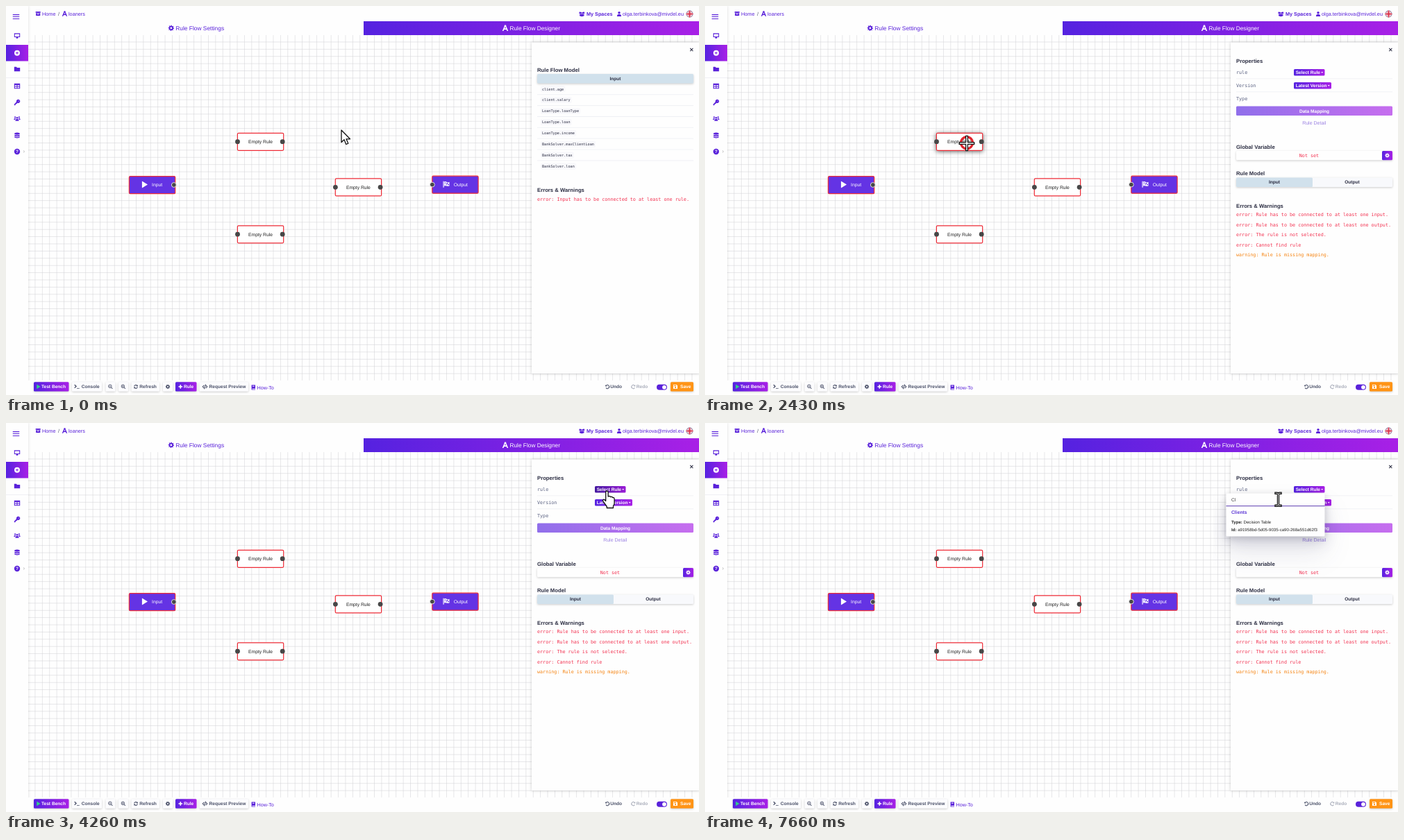
Animation, 998 px wide and 561 px high, one loop 8000 ms. Source, as an HTML page:

```html
<!DOCTYPE html>
<html lang="en">
<head>
<meta charset="utf-8">
<title>Rule flow designer</title>
<style>
html, body { margin: 0; width: 100%; height: 100%; overflow: hidden; background: #fefefe; }
svg { display: block; font-family: "Liberation Sans", Arial, sans-serif; text-rendering: geometricPrecision; }
text { white-space: pre; }
.b { font-weight: 700; }
.m { font-family: "DejaVu Sans Mono", monospace; }
.c { text-anchor: middle; }
.soft { filter: drop-shadow(0 1px 1.5px #0003); }
.float { filter: drop-shadow(0 2px 4px #0002) drop-shadow(0 8px 9px #32325d29) drop-shadow(0 22px 18px #32325d1c); }
.hover { filter: drop-shadow(0 1px 3px #0009); }
</style>
</head>
<body>
<svg id="stage" width="998" height="561" viewBox="0 0 998 561"></svg>
<script>
const PURPLE = '#5a22da', INK = '#2b2d42', SLATE = '#4a5068', RED = '#f2304f', NODE_RED = '#ee2b36';
const SMALL = 6.6, MONO = 6.74, LOOP = 8000;

const gearPath = () => {
  const points = [];
  for (let i = 0; i < 32; i++) {
    const r = i % 4 < 2 ? 8 : 5.8, a = i * Math.PI / 16;
    points.push(`${(8 + r * Math.cos(a)).toFixed(1)} ${(8 + r * Math.sin(a)).toFixed(1)}`);
  }
  return `M${points.join('L')}zM8 5.4a2.6 2.6 0 1 0 0 5.2 2.6 2.6 0 0 0 0-5.2z`;
};
const lens = 'M6.5 0a6.5 6.5 0 0 1 5.2 10.3L16 14l-2 2-3.7-4.3A6.5 6.5 0 1 1 6.5 0zM6.5 2a4.5 4.5 0 1 0 0 9 4.5 4.5 0 0 0 0-9z';
const disc = 'M8 0a8 8 0 1 1 0 16 8 8 0 1 1 0-16z';

// Icon outlines in a 16 by 16 box
const icons = {
  menu: 'M0 2h16v2H0zM0 7h16v2H0zM0 12h16v2H0z',
  desktop: 'M0 1h16v11H0zM2 3v7h12V3zM6 12h4l1 3H5z',
  add: disc + 'M7 4v3H4v2h3v3h2V9h3V7H9V4z',
  folder: 'M0 2h6l2 2h8v10H0z',
  table: 'M0 1h16v14H0zM2 5v3h5V5zM9 5v3h5V5zM2 10v3h5v-3zM9 10v3h5v-3z',
  key: 'M11 0a5 5 0 1 1-2 9.5L7 12H5v2H3v2H0v-3l6.2-6.2A5 5 0 0 1 11 0zM12 3a1 1 0 1 0 0 2 1 1 0 0 0 0-2z',
  users: 'M8 3a2.7 2.7 0 1 1 0 5.4A2.7 2.7 0 1 1 8 3zM2.5 2a2 2 0 1 1 0 4 2 2 0 1 1 0-4zM13.500 2a2 2 0 1 1 0 4 2 2 0 1 1 0-4zM3 14q0-5 4-5h2q4 0 4 5zM-1 11q0-4 3-4h2.5l-2 4zM17 11q0-4-3-4h-2.5l2 4z',
  database: 'M1 2q7-3 14 0v3q-7 3-14 0zM1 6.5q7 3 14 0V10q-7 3-14 0zM1 11.5q7 3 14 0V14q-7 3-14 0z',
  disc,
  gear: gearPath(),
  archive: 'M0 1h16v4H0zM1 6h14v9H1zM5 8v2h6V8z',
  compass: 'M6 0h4l1 4 5 12h-3l-2-4H5l-2 4H0L5 4zM8 4 6 9h4z',
  box: 'M2 2l6 2 6-2 2 4-6 2-2-3-2 3-6-2zM2 8l4 1 2-2 2 2 4-1v5l-6 2-6-2z',
  user: 'M8 0a4 4 0 1 1 0 8 4 4 0 1 1 0-8zM1 16q0-7 5-7h4q5 0 5 7z',
  play: 'M2 0l13 8-13 8z',
  terminal: 'M0 3l2-2 6 6-6 6-2-2 4-4zM8 12h8v2H8z',
  zoomOut: lens + 'M3.5 5.7h6v1.6h-6z',
  zoomIn: lens + 'M3.5 5.7h2.2V3.5h1.6v2.2h2.2v1.6H7.3v2.2H5.7V7.3H3.5z',
  refresh: 'M1 7A7 7 0 0 1 13 3l2-2v6H9l2-2A4.5 4.5 0 0 0 3.5 7zM15 9A7 7 0 0 1 3 13l-2 2V9h6l-2 2a4.5 4.5 0 0 0 7.5-2z',
  undo: 'M1 1v6h6L4.8 4.8A5 5 0 1 1 4 11L2 12.5A7.5 7.5 0 1 0 3 3z',
  redo: 'M15 1v6H9l2.2-2.2A5 5 0 1 0 12 11l2 1.5A7.5 7.5 0 1 1 13 3z',
  plus: 'M6 1h4v5h5v4h-5v5H6v-5H1V6h5z',
  code: 'M5 3 0 8l5 5 1.5-1.5L3 8l3.5-3.5zM11 3l5 5-5 5-1.5-1.5L13 8 9.5 4.5zM9 1l2 .5-4 13.5-2-.5z',
  book: 'M2 0h12v12H4v2h10v2H2zM5 3v2h6V3z',
  save: 'M0 0h12l4 4v12H0zM2 2v4h9V2zM8 8a3 3 0 1 0 0 6 3 3 0 0 0 0-6z',
  flag: 'M0 0h2v16H0zM3 1q3-1 6 1t7 0v10q-4 1-7 0t-6 0zM5 3h2v3H5zM9 4h3v3H9zM7 7h2v3H7zM12 7h3v3h-3z',
  close: 'M3 1 8 6l5-5 2 2-5 5 5 5-2 2-5-5-5 5-2-2 5-5-5-5z',
};

const text = (x, y, s, size = SMALL, cls = '', fill = INK) =>
  `<text x="${x}" y="${y + size * .35}" font-size="${size}" class="${cls}" fill="${fill}">${s}</text>`;
const rect = (x, y, w, h, fill, extra = '') =>
  `<rect x="${x}" y="${y}" width="${w}" height="${h}" fill="${fill}" ${extra}/>`;
const line = (x1, y, x2, color = '#e6e8ee', w = .6) =>
  `<path d="M${x1} ${y}H${x2}" stroke="${color}" stroke-width="${w}"/>`;
const icon = (name, x, y, size = 8, fill = PURPLE) =>
  `<path transform="translate(${x - size / 2} ${y - size / 2}) scale(${size / 16})" d="${icons[name]}" fill="${fill}" fill-rule="evenodd"/>`;
const group = (id, body, extra = '') => `<g id="${id}" ${extra}>${body}</g>`;
const button = (x, w, fill = '#fcfcfe') => rect(x, 542.3, w, 13.4, fill, 'rx="1.5" class="soft"');

function sidebar() {
  const items = [['desktop', 43], ['folder', 91], ['table', 115.5], ['key', 139], ['users', 162.5], ['database', 186.5], ['disc', 210]];
  return rect(0, 0, 32, 561, '#fefefe', 'style="filter:drop-shadow(0 0 2px #0002)"')
    + icon('menu', 14.5, 15.5, 9.5) + rect(0, 56, 32, 23.5, 'url(#brand)') + icon('add', 16, 67.8, 8, '#fff')
    + items.map(([name, y]) => icon(name, 16, y, 8.4)).join('')
    + text(16, 210, '?', 6.5, 'b c', '#fff') + text(24.5, 209.5, '›', 8, '', '#aaa') + line(0, 103.5, 32);
}

function header() {
  const flag = `<g clip-path="url(#round)">${rect(979, 6, 11, 11, '#31437e')}
    <path d="M979 6l11 11M990 6l-11 11" stroke="#fff" stroke-width="2"/><path d="M979 6l11 11M990 6l-11 11" stroke="#d8304a" stroke-width=".7"/>
    <path d="M984.5 6v11M979 11.5h11" stroke="#fff" stroke-width="3.4"/><path d="M984.5 6v11M979 11.5h11" stroke="#d8304a" stroke-width="2"/></g>`;
  return rect(32, 0, 966, 42, '#fefefe') + rect(515, 22, 483, 20, 'url(#brand)')
    + icon('archive', 46.2, 11, 7) + text(52, 11.2, 'Home', 7.3, '', PURPLE) + text(75, 11.2, '/', 7.3, '', SLATE)
    + icon('compass', 84.5, 11, 7.5) + text(90, 11.2, 'loaners', 7.3, '', PURPLE)
    + icon('box', 829.3, 11.5, 8.5) + text(836, 11.5, 'My Spaces', 7.25, 'b', PURPLE)
    + icon('user', 883, 11.5, 7) + text(888, 11.5, 'olga.terbinkova@mivdel.eu', 7.29, '', PURPLE) + flag
    + icon('gear', 237.8, 31.8, 8.5) + text(244.3, 31.8, 'Rule Flow Settings', 8.4, '', PURPLE)
    + icon('compass', 719, 31.8, 8.5, '#fff') + text(725.5, 31.8, 'Rule Flow Designer', 8.3, '', '#fff');
}

function toolbar() {
  const y = 549, pale = '#a9adba';
  const label = (x, s, fill = SLATE) => text(x, y, s, SMALL, 'b', fill);
  return rect(32, 540, 966, 21, '#fefefe')
    + button(40, 50.5, 'url(#brand)') + icon('play', 46.7, y, 6.5, '#2fd08a') + label(51, 'Test Bench', '#fff')
    + button(95, 43) + icon('terminal', 102, y, 7.5, SLATE) + label(108.7, 'Console')
    + button(143.5, 14) + icon('zoomOut', 150.5, y, 6.5, SLATE)
    + button(162, 14) + icon('zoomIn', 169, y, 6.5, SLATE)
    + button(180.5, 40.5) + icon('refresh', 187, y, 6.5, SLATE) + label(192.3, 'Refresh')
    + button(226, 14) + icon('gear', 233, y, 6.5, SLATE)
    + button(244, 30.5, 'url(#brand)') + icon('plus', 251.3, y, 6.5, '#fff') + label(256, 'Rule', '#fff')
    + button(278.5, 70.5) + icon('code', 286.5, y, 8, SLATE) + label(292.5, 'Request Preview')
    + icon('book', 356.3, 550, 7.2) + text(361.5, 550.2, 'How-To', 7.2, '', PURPLE)
    + icon('undo', 866, y, 6.5, SLATE) + label(870.3, 'Undo')
    + icon('redo', 903.5, y, 6.5, pale) + label(907.8, 'Redo', pale)
    + rect(937, 545.8, 15, 8, PURPLE, 'rx="4"') + '<circle cx="948" cy="549.8" r="2.9" fill="#fff"/>'
    + button(957, 33, '#ff9416') + icon('save', 964, y, 6, '#fff') + label(971, 'Save', '#fff');
}

const box = (x, y, fill, extra = '') =>
  rect(x, y, 66.3, 25, fill, `rx="1.5" stroke="${NODE_RED}" stroke-width="1.2" ${extra}`);
const port = (x, y, extra = '') => `<circle cx="${x}" cy="${y}" r="3.4" fill="#474747" ${extra}/>`;
const emptyRule = (x, y, id) => box(x, y, '#fff', `id="${id}"`) + text(x + 33.1, y + 12.4, 'Empty Rule', 6.77, 'c', '#222')
  + port(x + .1, y + 12.4) + port(x + 64.8, y + 12.4);

function nodes() {
  const ring = 'stroke="#eee" stroke-width=".9"';
  return emptyRule(333.4, 183.3, 'target') + emptyRule(333.4, 316.8, 'lower') + emptyRule(474.3, 248.9, 'middle')
    + box(177.4, 245.7, '#6433e4') + icon('play', 199.6, 257.5, 10, '#fff') + text(210, 258, 'Input', 6.75, '', '#fff') + port(241.8, 258, ring)
    + box(613.8, 245.2, '#6433e4') + icon('flag', 634, 257.2, 9, '#fff') + text(644.7, 257.6, 'Output', 6.75, '', '#fff') + port(613.9, 257.6, ring);
}

const heading = (y, s) => text(765, y, s, 7.72, 'b');
const mono = (y, s, fill = RED) => text(765, y, s, MONO, 'm', fill);

function modelPanel() {
  const rows = ['client.age', 'client.salary', 'LoanType.loanType', 'LoanType.loan', 'LoanType.income',
    'BankSolver.maxClientLoan', 'BankSolver.tax', 'BankSolver.loan'];
  return heading(92, 'Rule Flow Model') + rect(765, 98, 225, 13.5, '#d1e1ec', 'rx="1.5" class="soft"')
    + text(877.5, 104.8, 'Input', 6.5, 'b c')
    + rows.map((s, i) => {
      const y = 119.8 + i * 15.87;
      return rect(770, y - 4.5, s.length * 3.13 + 4, 9, '#f8f8fb', 'rx="1.5"') + text(772, y, s, 5.2, 'm')
        + (i < 7 ? line(765, y + 7.9, 990) : '');
    }).join('')
    + heading(265.5, 'Errors &amp; Warnings') + mono(279, 'error: Input has to be connected to at least one rule.');
}

const select = (y, w, s, id) => rect(848, y - 4.8, w, 9.6, 'url(#brand)', `id="${id}" rx="1.5"`)
  + text(850.7, y, s, 6.55, 'b', '#fff') + `<path d="M${848 + w - 5.3} ${y - .7}h3l-1.5 1.7z" fill="#fff"/>`;

function rulePanel() {
  const errors = ['Rule has to be connected to at least one input.', 'Rule has to be connected to at least one output.',
    'The rule is not selected.', 'Cannot find rule'];
  return heading(79.5, 'Properties')
    + mono(95.6, 'rule', '#5b6282') + select(95.7, 44.5, 'Select Rule', 'select') + line(765, 104.8, 990)
    + mono(114.3, 'Version', '#5b6282') + select(114.7, 54, 'Latest Version', 'version') + line(765, 123.8, 990)
    + mono(133.3, 'Type', '#5b6282')
    + rect(765, 144.5, 225, 13.5, 'url(#brand)', 'rx="1.5" opacity=".65"') + text(877.5, 151.2, 'Data Mapping', SMALL, 'b c', '#fff')
    + text(877.3, 168.7, 'Rule Detail', 7, 'c', '#9a80e2')
    + heading(202.8, 'Global Variable') + rect(765, 209, 225, 13.3, '#fefefe', 'rx="1.5" class="soft"')
    + text(870, 215.6, 'Not set', MONO, 'm c', RED) + rect(975, 209, 15, 13.3, 'url(#brand)', 'rx="1.5"') + icon('gear', 982.5, 215.5, 6.5, '#fff')
    + heading(241, 'Rule Model') + rect(765, 247.5, 225, 13.5, '#f8f9fc', 'rx="1.5" class="soft"') + rect(765, 247.5, 110, 13.5, '#d1e1ec', 'rx="1.5"')
    + text(820, 254, 'Input', SMALL, 'b c') + text(932, 254, 'Output', SMALL, 'b c')
    + heading(287.8, 'Errors &amp; Warnings') + errors.map((s, i) => mono(301 + i * 14.4, 'error: ' + s)).join('')
    + mono(358.4, 'warning: Rule is missing mapping.', '#f5820f');
}

function option(x, y, name, id) {
  const pair = (dy, key, value) => text(x, y + dy, `<tspan class="b">${key}:</tspan> ${value}`, 6.12, '', '#222');
  return text(x, y, name, 6.75, 'b', '#5b35d5') + pair(13.6, 'Type', 'Decision Table') + pair(24.6, 'Id', id);
}

function fullMenu() {
  const rules = [['RC', 'fc63d823-b7e1-c08e-3a72-605aaee2c740'], ['Louisiana Tax Credit', 'eabd4cfa-9271-4dc5-0692-b6fe6d9c7e63'],
    ['V4', 'ea2a5539-08ad-da76-5032-7666e56e8ef7'], ['FinalScore', 'e2367b8e-cfc6-775e-9f61-b2e767b88225'], ['Louisiana Exemption', '']];
  return rect(740, 101.5, 152, 207.5, '#fefefe', 'rx="1.5" class="float"')
    + `<g clip-path="url(#list)">${rules.map(([name, id], i) => option(748, 129 + i * 43.35, name, id)
      + line(740, 163.5 + i * 43.35, 884)).join('')}</g>`
    + rect(884, 102, 8, 206.5, '#f1f1f1') + rect(884.7, 110.5, 6.4, 25.8, '#c1c1c1')
    + '<path d="M886 107.5h4l-2-2.3z" fill="#888"/><path d="M886 303h4l-2 2.3z" fill="#444"/>'
    + line(740, 119.7, 884, '#5a3bb0', 1);
}

function filteredMenu() {
  return rect(750.5, 101.5, 142, 62, '#fefefe', 'rx="1.5" class="float"') + line(750.5, 119.7, 892.5, '#5a3bb0', 1)
    + option(758, 129, 'Clients', 'a91958bd-5d05-9035-ca90-268a551d62f3');
}

function cursors() {
  const shape = (name, d) => `<path id="${name}" d="${d}" fill="#fff" stroke="#111" stroke-width="1.3" stroke-linejoin="round"/>`;
  // Repeats one arm of a cross in four directions.
  const cross = arm => 'M' + [0, 1, 2, 3].flatMap(turn => arm.map(([x, y]) => {
    for (let i = 0; i < turn; i++) [x, y] = [-y, x];
    return `${x} ${y}`;
  })).join('L') + 'z';
  const beam = 'M-3.5-9H-2Q0-9 0-7V7Q0 9-2 9H-3.5M3.5-9H2Q0-9 0-7M0 7Q0 9 2 9H3.5';
  return shape('arrow', 'M0 0V17.5L4 13.8 6.8 20.5 9.8 19.2 7 12.8H12.5z')
    + shape('move', cross([[-1.3, -1.3], [-1.3, -7.5], [-5, -7.5], [0, -13], [5, -7.5], [1.3, -7.5]]))
    + shape('cross', cross([[-1.4, -1.4], [-1.4, -10.7], [1.4, -10.7]]))
    + shape('hand', 'M.2 3Q.2 1 1.9 1T3.7 3V9Q6.4 7.7 7.3 9.7 9.2 8.8 10 10.6 12.6 10 12.6 12.8V18.5Q12.6 21 11 22.5V25.5H1.8V23.5L-3.3 16.5Q-4.8 13.9-3 13.3-1.6 13 .2 15.5z')
    + `<g id="beam" fill="none" stroke-linecap="square"><path d="${beam}" stroke="#111" stroke-width="3.4"/><path d="${beam}" stroke="#fff" stroke-width=".8"/></g>`;
}

const stage = document.getElementById('stage');
stage.innerHTML = `<defs>
  <linearGradient id="brand"><stop stop-color="#5522e0"/><stop offset="1" stop-color="#a820e6"/></linearGradient>
  <linearGradient id="brandDark"><stop stop-color="#43189f"/><stop offset="1" stop-color="#9a1cd6"/></linearGradient>
  <pattern id="grid" x="32" y="42" width="10.396" height="10.396" patternUnits="userSpaceOnUse">
    <path d="M10.1 0V10.396M0 10.1H10.396" stroke="#cfcfd3" stroke-width=".6"/></pattern>
  <clipPath id="round"><circle cx="984.5" cy="11.5" r="4.9"/></clipPath>
  <clipPath id="list"><path d="M740 101.5h152V308.5H740z"/></clipPath>
  <clipPath id="popup"><path d="M732 52H998V530H732z"/></clipPath></defs>`
  + rect(0, 0, 998, 561, '#fefefe') + rect(32, 42, 966, 498, 'url(#grid)')
  + header() + sidebar() + toolbar() + nodes()
  + rect(757, 52.5, 241, 477.5, '#fefefe', 'style="filter:drop-shadow(0 0 2px #0003)"') + icon('close', 987.3, 63, 5.5, INK)
  + group('modelPanel', modelPanel()) + group('rulePanel', rulePanel())
  + group('fullMenu', fullMenu(), 'clip-path="url(#popup)"') + group('filteredMenu', filteredMenu(), 'clip-path="url(#popup)"')
  + text(748, 110.4, '', 6.5).replace('<text', '<text id="query"') + rect(748, 106, .8, 9, '#222', 'id="caret"')
  + '<circle id="ring" fill="none" stroke="#e0262f" stroke-width="3.4"/>'
  + group('pointer', cursors());

const el = Object.fromEntries([...stage.querySelectorAll('[id]')].map(node => [node.id, node]));
const show = (node, on) => node.setAttribute('display', on ? 'inline' : 'none');

// Pointer moves; lift bends the path upwards.
const moves = [
  { start: 1165, end: 1730, from: [483, 179], to: [377, 198], lift: 26 },
  { start: 3150, end: 4260, from: [377, 198], to: [863.5, 97], lift: 0 },
  { start: 4750, end: 5300, from: [863.5, 97], to: [825.5, 110.3], lift: 0 },
];
const clicks = [{ at: 2030, x: 377, y: 197.3 }, { at: 4460, x: 863.5, y: 96.6 }, { at: 5615, x: 825.5, y: 109 }];
const PANEL_AT = 2130, MENU_AT = 4560, FOCUS_AT = 5720, FIRST_KEY = 7000, SECOND_KEY = 7130;
const RING_TIME = 1185, BLINK = 530;

function pointerAt(t) {
  const move = moves.findLast(m => t >= m.start) || moves[0];
  const p = Math.min(1, Math.max(0, (t - move.start) / (move.end - move.start)));
  const e = p * p * (3 - 2 * p);
  const [x, y] = move.from.map((v, i) => v + (move.to[i] - v) * e);
  return [x, y - 2 * move.lift * e * (1 - e)];
}

function render(t) {
  const [x, y] = pointerAt(t);
  const inside = (l, top, r, b) => x >= l && x <= r && y >= top && y <= b;
  const menu = t >= MENU_AT, filtered = t >= SECOND_KEY;
  const overNode = inside(333, 183, 400, 209);
  const overSelect = t >= PANEL_AT && inside(848, 91, 892.5, 101.2);

  const kind = overNode ? (t < clicks[0].at ? 'move' : 'cross') : overSelect ? 'hand' : menu ? 'beam' : 'arrow';
  for (const name of ['arrow', 'move', 'cross', 'hand', 'beam']) show(el[name], name === kind);
  el.pointer.setAttribute('transform', `translate(${x} ${y})`);
  el.target.setAttribute('class', overNode ? 'hover' : '');
  el.select.setAttribute('fill', overSelect ? 'url(#brandDark)' : 'url(#brand)');

  show(el.modelPanel, t < PANEL_AT);
  show(el.rulePanel, t >= PANEL_AT);
  show(el.fullMenu, menu && !filtered);
  show(el.filteredMenu, filtered);

  const typed = filtered ? 'Cl' : t >= FIRST_KEY ? 'C' : '';
  const left = filtered ? 758 : 748;
  show(el.query, menu);
  el.query.textContent = typed || 'Search...';
  el.query.setAttribute('x', left);
  el.query.setAttribute('fill', typed ? '#333' : '#777');
  const focus = [SECOND_KEY, FIRST_KEY, FOCUS_AT, MENU_AT].find(at => t >= at);
  show(el.caret, menu && Math.floor((t - focus) / BLINK) % 2 === 0);
  el.caret.setAttribute('x', left + [0, 4.8, 6.3][typed.length]);

  const click = clicks.find(c => t >= c.at && t < c.at + RING_TIME);
  show(el.ring, click);
  if (click) {
    const p = (t - click.at) / RING_TIME;
    el.ring.setAttribute('cx', click.x);
    el.ring.setAttribute('cy', click.y);
    el.ring.setAttribute('r', 1 + 22.3 * p);
    el.ring.setAttribute('opacity', Math.min(1, (1 - p) * 1.6));
  }
}

const began = performance.now();
function frame() {
  render((performance.now() - began) % LOOP);
  requestAnimationFrame(frame);
}
frame();
</script>
</body>
</html>
```
